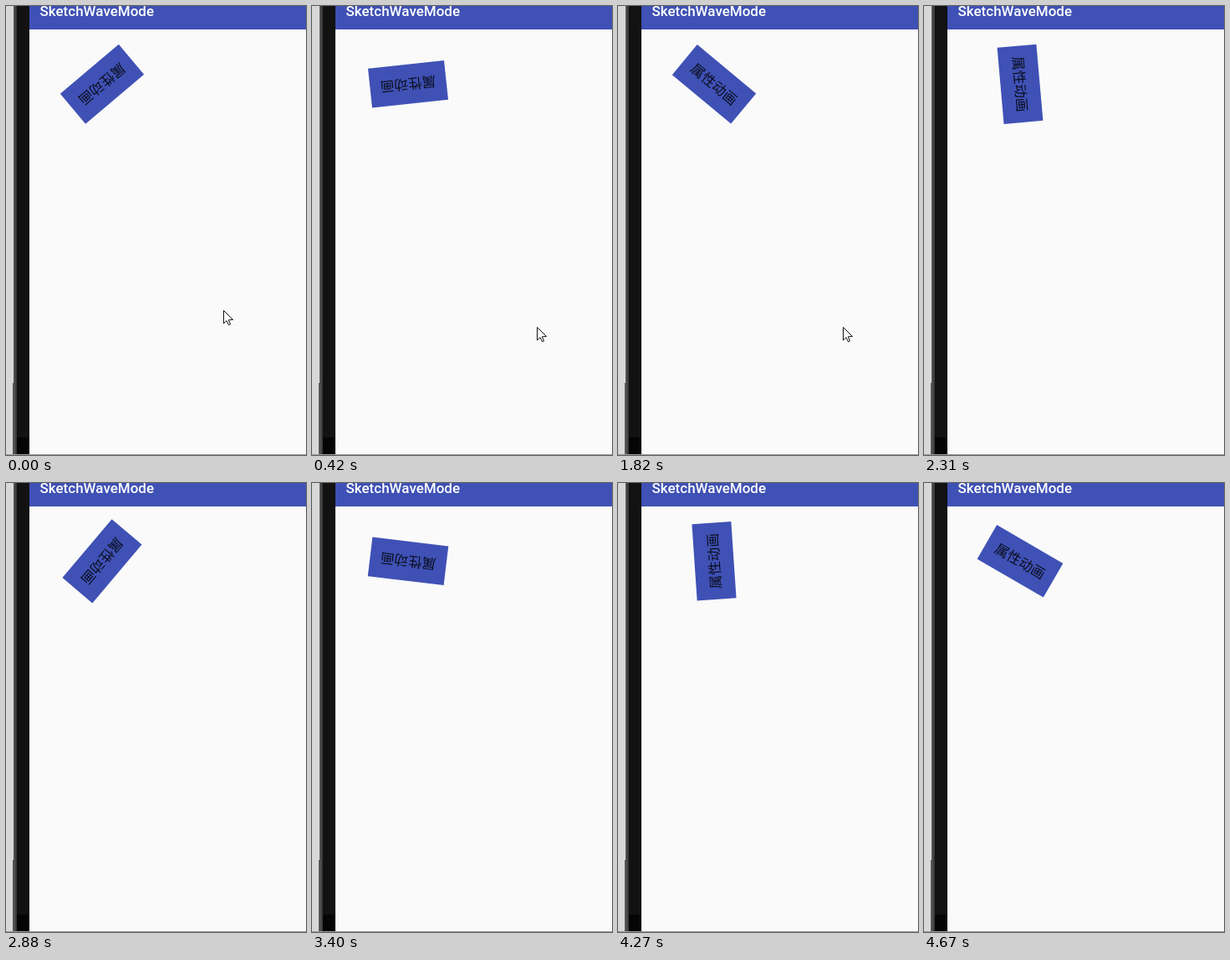
Recreate the animation shown at these times as an HTML page with a canvas. Size 359 px wide and 536 px high, loop 4.77 s.

```html
<!DOCTYPE html>
<html lang="zh-CN">
<head>
<meta charset="utf-8">
<title>Rotating button</title>
<style>
  html, body { margin: 0; width: 100%; height: 100%; overflow: hidden; background: #fafafa; }
  canvas { display: block; }
</style>
</head>
<body>
<canvas id="stage" width="359" height="536"></canvas>
<script>
const ctx = document.getElementById('stage').getContext('2d');
const LOOP = 4770;
const BLUE = '#3f51b5';
const BUTTON = { x: 115, y: 93.3, w: 91.5, h: 47 };

// The picture is refreshed in even steps; the button turns by a fixed angle
// per step, skips ahead one extra step now and then, and restarts at 270.
const STEP_MS = 135.8;
const LAST_STEP = 34;
const FIRST_ANGLE = 139.9;
const STEP_ANGLE = 11.32;
const FULL_TURN = 270;
const SKIPS = [5, 11, 25, 29];

const POINTER = { from: [260, 363], to: [269, 383], steps: 3, gone: 15 };

const easeOut = u => 1 - (1 - u) ** 2;
const lerp = (a, b, u) => a + (b - a) * u;

function angleAt(step) {
  const skipped = SKIPS.filter(skip => skip <= step).length;
  return (FIRST_ANGLE + STEP_ANGLE * (step + skipped)) % FULL_TURN;
}

function rect(color, x, y, w, h) {
  ctx.fillStyle = color;
  ctx.fillRect(x, y, w, h);
}

function gradient(x0, y0, x1, y1, ...colors) {
  const fill = ctx.createLinearGradient(x0, y0, x1, y1);
  colors.forEach((color, i) => fill.addColorStop(i / (colors.length - 1), color));
  return fill;
}

function drawScreen() {
  rect('#fafafa', 0, 0, 359, 536);
  rect('#d8d8d8', 0, 0, 9, 535);
  rect('#555', 8, 450, 1, 85);
  rect(gradient(9, 0, 13, 0, '#5a5a5a', '#303030'), 9, 0, 4, 535);
  rect('#121212', 13, 0, 15, 515);
  rect('#050505', 13, 515, 15, 20);
  rect(BLUE, 28, 0, 331, 28);
  rect('#999', 0, 535, 359, 1);

  ctx.fillStyle = '#fff';
  ctx.font = '500 17px Roboto, sans-serif';
  ctx.textAlign = 'left';
  ctx.fillText('SketchWaveMode', 40.5, 11.5);
}

function drawButton(degrees) {
  const { x, y, w, h } = BUTTON;
  ctx.save();
  ctx.translate(x, y);
  ctx.rotate(degrees * Math.PI / 180);
  rect(BLUE, -w / 2, -h / 2, w, h);
  ctx.fillStyle = '#0b0e1e';
  ctx.font = '16.6px "Noto Sans CJK SC", "Noto Sans CJK", sans-serif';
  ctx.textAlign = 'center';
  ctx.fillText('属性动画', 0, 6.2);
  ctx.restore();
}

function drawPointer(step) {
  const { from, to, steps, gone } = POINTER;
  if (step >= gone) return;
  const u = easeOut(Math.min(step / steps, 1));
  const [x, y] = from.map((start, i) => Math.round(lerp(start, to[i], u)));
  ctx.save();
  ctx.translate(x + 0.5, y + 0.5);
  ctx.beginPath();
  [[0, 0], [0, 15.5], [3.5, 12.2], [6, 17.3], [8, 16.4], [5.8, 11.3], [11, 11]]
    .forEach(([px, py]) => ctx.lineTo(px, py));
  ctx.closePath();
  ctx.fillStyle = '#fff';
  ctx.fill();
  ctx.strokeStyle = '#111';
  ctx.lineWidth = 1;
  ctx.stroke();
  ctx.restore();
}

function draw(time) {
  const step = Math.min(Math.floor((time + 5) / STEP_MS), LAST_STEP);
  drawScreen();
  drawButton(angleAt(step));
  drawPointer(step);
}

const start = performance.now();
function tick() {
  draw((performance.now() - start) % LOOP);
  requestAnimationFrame(tick);
}
tick();
</script>
</body>
</html>
```
